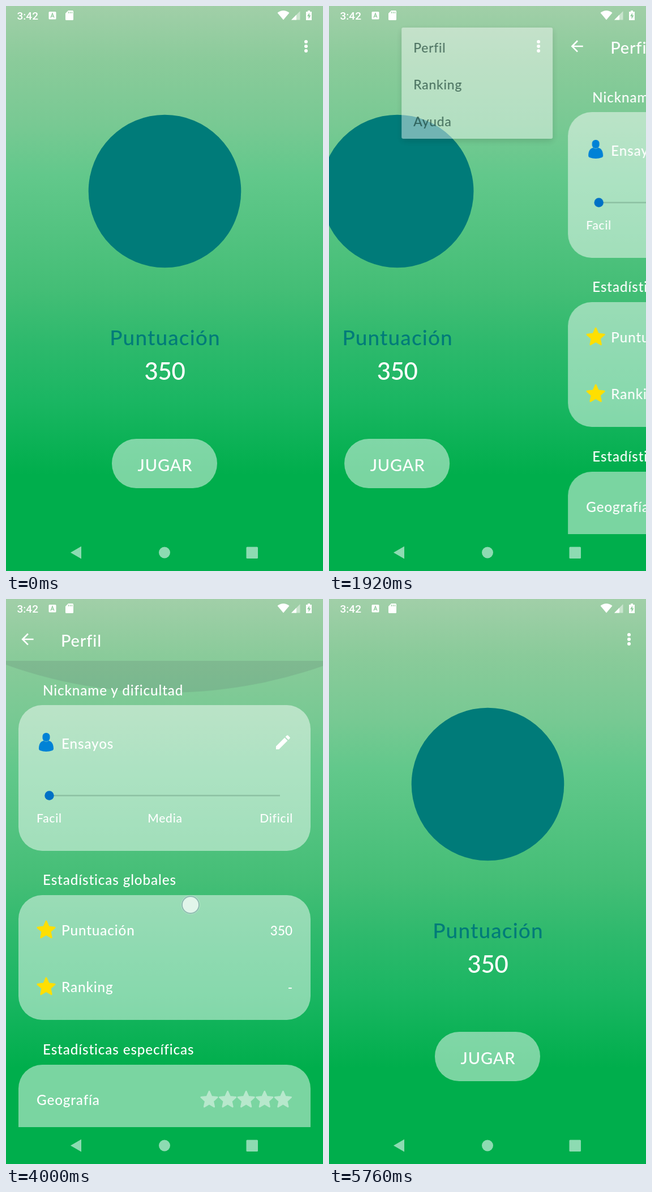
These frames come from a looping animation (560x996 px, 5840 ms). An HTML page:

```html
<!DOCTYPE html>
<html lang="es">
<head>
<meta charset="utf-8">
<title>Perfil</title>
<style>
html, body { margin: 0; width: 100%; height: 100%; overflow: hidden; background: #00ae4c; }
svg { display: block; width: 560px; height: 996px; }
text { font-family: Lato, "Open Sans", sans-serif; font-weight: 500; font-size: 24.3px; letter-spacing: .035em; fill: #fff; }
.end { text-anchor: end; }
.mid { text-anchor: middle; }
.small { font-size: 21px; }
.title { font-size: 29px; letter-spacing: .028em; }
.label { font-size: 37px; letter-spacing: .03em; fill: #007b79; }
.score { font-size: 42px; letter-spacing: -.01em; }
.num { font-size: 22.5px; letter-spacing: 0; }
.clock { font: 500 19px Roboto, sans-serif; letter-spacing: 0; }
.menu text { font-size: 23px; fill: #3c5a52; letter-spacing: .03em; }
.panel { fill: #fbfbfb; filter: drop-shadow(0 4px 6px rgba(0, 0, 0, .3)); }
.white { fill: #fff; }
.glass { fill: #fff; fill-opacity: .48; }
.gold { fill: #ffdf00; stroke: #ffdf00; }
.pale { fill: #fff; stroke: #fff; opacity: .46; }

.track, .menu, .panel, .scroll, .glow, .ripple, .spot, .dot { animation: 5840ms linear infinite; }
.track { animation-name: slide; }
.menu { animation-name: menu; transform-origin: 555px 38px; }
.panel { animation-name: panel; }
.scroll { animation-name: scroll; }
.glow { animation-name: glow; }
.ripple { animation-name: ripple; }
.spot { animation-name: move; }
.dot { animation-name: touch; }

@keyframes slide {
  0%, 31.525% { transform: translateX(0); animation-timing-function: cubic-bezier(.37, 0, .63, 1); }
  35.326%, 86.834% { transform: translateX(-560px); animation-timing-function: cubic-bezier(.37, 0, .63, 1); }
  90.635%, 100% { transform: translateX(0); }
}
@keyframes menu {
  0%, 12.33% { opacity: 0; transform: scale(.6); animation-timing-function: ease-out; }
  15.75%, 32.2% { opacity: 1; transform: none; }
  35.3%, 100% { opacity: 0; transform: none; }
}
/* the panel clears faster than its labels */
@keyframes panel {
  0%, 31.525% { opacity: 1; }
  34.5%, 100% { opacity: .1; }
}
@keyframes scroll {
  0%, 46.575% { transform: translateY(0); }
  49.315% { transform: translateY(-28px); }
  54.795%, 63.014% { transform: translateY(-112px); }
  67.808%, 100% { transform: translateY(0); }
}
@keyframes glow {
  0%, 66.781% { transform: translateY(-56px); opacity: 0; }
  68.493% { transform: translateY(0); opacity: 1; }
  69.863% { transform: translateY(4px); opacity: 1; }
  75.342%, 100% { transform: translateY(-56px); opacity: 0; }
}
@keyframes ripple {
  0%, 86.3% { opacity: 0; }
  87.7%, 90% { opacity: 1; }
  95.9%, 100% { opacity: 0; }
}
@keyframes move {
  0%, 16% { transform: translate(530px, 71px); }
  16.01%, 31% { transform: translate(370px, 76px); }
  31.01%, 46.575% { transform: translate(340px, 715px); }
  49.315% { transform: translate(337px, 676px); }
  54.795%, 58% { transform: translate(334px, 590px); }
  58.01%, 63.014% { transform: translate(333px, 370px); }
  65.753% { transform: translate(329px, 478px); }
  68.493% { transform: translate(326px, 539px); }
  70%, 74% { transform: translate(325px, 550px); }
  74.01%, 100% { transform: translate(40px, 79px); }
}
@keyframes touch {
  0%, 9.5% { opacity: 0; }
  9.59%, 12.33% { opacity: 1; }
  13.7%, 24.6% { opacity: 0; }
  24.66%, 28.77% { opacity: 1; }
  30.14%, 46.5% { opacity: 0; }
  46.58%, 55% { opacity: 1; }
  57%, 62.9% { opacity: 0; }
  63.01%, 70% { opacity: 1; }
  73%, 86.2% { opacity: 0; }
  86.3%, 87.7% { opacity: 1; }
  89.04% { opacity: .18; }
  90%, 100% { opacity: 0; }
}
</style>
</head>
<body>
<svg viewBox="0 0 560 996">
  <defs>
    <linearGradient id="sky" x2="0" y2="1">
      <stop offset="0" stop-color="#a1cfa8"/>
      <stop offset=".1" stop-color="#8acb9a"/>
      <stop offset=".21" stop-color="#78c993"/>
      <stop offset=".3" stop-color="#62c88b"/>
      <stop offset=".5" stop-color="#44be76"/>
      <stop offset=".6" stop-color="#2db96c"/>
      <stop offset=".7" stop-color="#1ab662"/>
      <stop offset=".83" stop-color="#00ae4c"/>
    </linearGradient>
    <clipPath id="view"><rect y="109" width="560" height="822"/></clipPath>
    <clipPath id="half"><rect x="-20" y="-20" width="20" height="40"/></clipPath>
    <path id="star" stroke-width="2.6" stroke-linejoin="round" d="M0-15L4.1-5.7 14.3-4.6 6.7 2.2 8.8 12.1 0 7-8.8 12.1-6.7 2.2-14.3-4.6-4.1-5.7Z"/>
    <g id="five">
      <use href="#star"/><use href="#star" x="32.6"/><use href="#star" x="65.2"/>
      <use href="#star" x="97.8"/><use href="#star" x="130.4"/>
    </g>
  </defs>

  <rect width="560" height="996" fill="url(#sky)"/>

  <g class="track">
    <g id="home">
      <g class="white"><circle cx="530" cy="63" r="3"/><circle cx="530" cy="71" r="3"/><circle cx="530" cy="79" r="3"/></g>
      <circle cx="280.5" cy="326.5" r="134.8" fill="#007b79"/>
      <text class="label mid" x="281" y="598">Puntuación</text>
      <text class="score mid" x="280.5" y="659">350</text>
      <rect class="glass" x="187" y="763" width="186" height="87" rx="43"/>
      <text class="title mid" x="281" y="820">JUGAR</text>
      <g class="menu">
        <rect class="panel" x="288" y="38" width="267" height="196" rx="3"/>
        <text x="309" y="82">Perfil</text>
        <text x="309" y="147">Ranking</text>
        <text x="309" y="212">Ayuda</text>
      </g>
    </g>

    <g id="profile" transform="translate(560)">
      <circle class="ripple" cx="38" cy="71" r="27.5" fill="#fff" fill-opacity=".22"/>
      <path class="white" transform="translate(22 55) scale(1.33)" d="M20 11H7.83l5.59-5.59L12 4l-8 8 8 8 1.41-1.41L7.83 13H20z"/>
      <text class="title" x="97" y="84">Perfil</text>

      <g clip-path="url(#view)">
        <circle class="glow" cx="283" cy="-675" r="840" fill="#648276" fill-opacity=".24"/>
        <g class="scroll">
          <text x="65" y="170">Nickname y dificultad</text>
          <rect class="glass" x="22" y="187" width="516" height="257" rx="42"/>
          <g fill="#0082d6">
            <rect x="64.5" y="236" width="13" height="15" rx="6"/>
            <path d="M58 264c0-9 4-14 9-14q4 3 8 0c5 0 9 5 9 14q0 2-2 3-11 4-22 0-2-1-2-3z"/>
          </g>
          <text x="98" y="264">Ensayos</text>
          <path class="white" transform="translate(472.8 236) scale(1.38)" d="M3 17.25V21h3.75L17.81 9.94l-3.75-3.75zM20.71 7.04c.39-.39.39-1.02 0-1.41l-2.34-2.34c-.39-.39-1.02-.39-1.41 0l-1.83 1.83 3.75 3.75z"/>
          <path d="M77 346.5H484" stroke="#8cc0a2" stroke-width="2.4"/>
          <circle cx="76.5" cy="346.5" r="8.2" fill="#0071c5"/>
          <text class="small" x="54" y="394">Facil</text>
          <text class="small mid" x="281" y="394">Media</text>
          <text class="small end" x="507" y="394">Dificil</text>

          <text x="65" y="504">Estadísticas globales</text>
          <rect class="glass" x="22" y="522" width="516" height="220" rx="42"/>
          <use class="gold" href="#star" transform="translate(71 584) scale(1.06)"/>
          <text x="98" y="593">Puntuación</text>
          <text class="num end" x="506" y="593">350</text>
          <use class="gold" href="#star" transform="translate(71 684) scale(1.06)"/>
          <text x="98" y="693">Ranking</text>
          <text class="num end" x="506" y="693">-</text>

          <text x="65" y="803">Estadísticas específicas</text>
          <rect class="glass" x="22" y="821" width="516" height="194" rx="42"/>
          <text x="54" y="892">Geografía</text>
          <use class="pale" href="#five" x="359" y="883"/>
          <text x="54" y="969">Tecnología</text>
          <g transform="translate(359 961)">
            <use class="pale" href="#five"/>
            <g class="gold">
              <use href="#star"/><use href="#star" x="32.6"/><use href="#star" x="65.2"/>
              <g transform="translate(98.4)"><use href="#star" clip-path="url(#half)"/></g>
            </g>
            <path d="M98.8-16V8" stroke="#4c5a38" stroke-width="1.3"/>
          </g>
        </g>
      </g>
    </g>
  </g>

  <g id="status" class="white">
    <text class="clock" x="19.5" y="24">3:42</text>
    <rect x="75.5" y="10" width="13" height="13.5" rx="1.5"/>
    <path d="M79 20.5L82 13l3 7.5M80 18h4" fill="none" stroke="#95cda0" stroke-width="1.4"/>
    <path d="M110 8h7.5q1.5 0 1.5 1.5v14q0 1.5-1.5 1.5h-11q-1.5 0-1.5-1.5V13z"/>
    <path d="M110.500 10v3M113.500 10v3M116.500 10v3" stroke="#9ccea5" stroke-width="1.3"/>
    <path d="M479.500 12Q490 4 500.500 12L490 24.500z"/>
    <path d="M519.500 9v15.500H504z" opacity=".45"/>
    <path d="M513 15.500v9h-9z"/>
    <path d="M533 8h4v2h3v15h-10V10h3z"/>
    <path d="M536 12l-4 6h2.500v5l4-6.500H536z" fill="#91cc9e"/>
  </g>

  <g id="nav" fill="#8ddbb2">
    <path d="M114 963.500L133 952.500v22z"/>
    <circle cx="280" cy="963.5" r="10"/>
    <rect x="424.5" y="953.5" width="20.5" height="20.5" rx="1.5"/>
  </g>

  <g class="spot">
    <g class="dot">
      <circle r="17" fill="#fff" fill-opacity=".25"/>
      <circle r="15" fill="#fff" fill-opacity=".62" stroke="#8ab8ae" stroke-width="1.8"/>
    </g>
  </g>
</svg>
</body>
</html>
```
